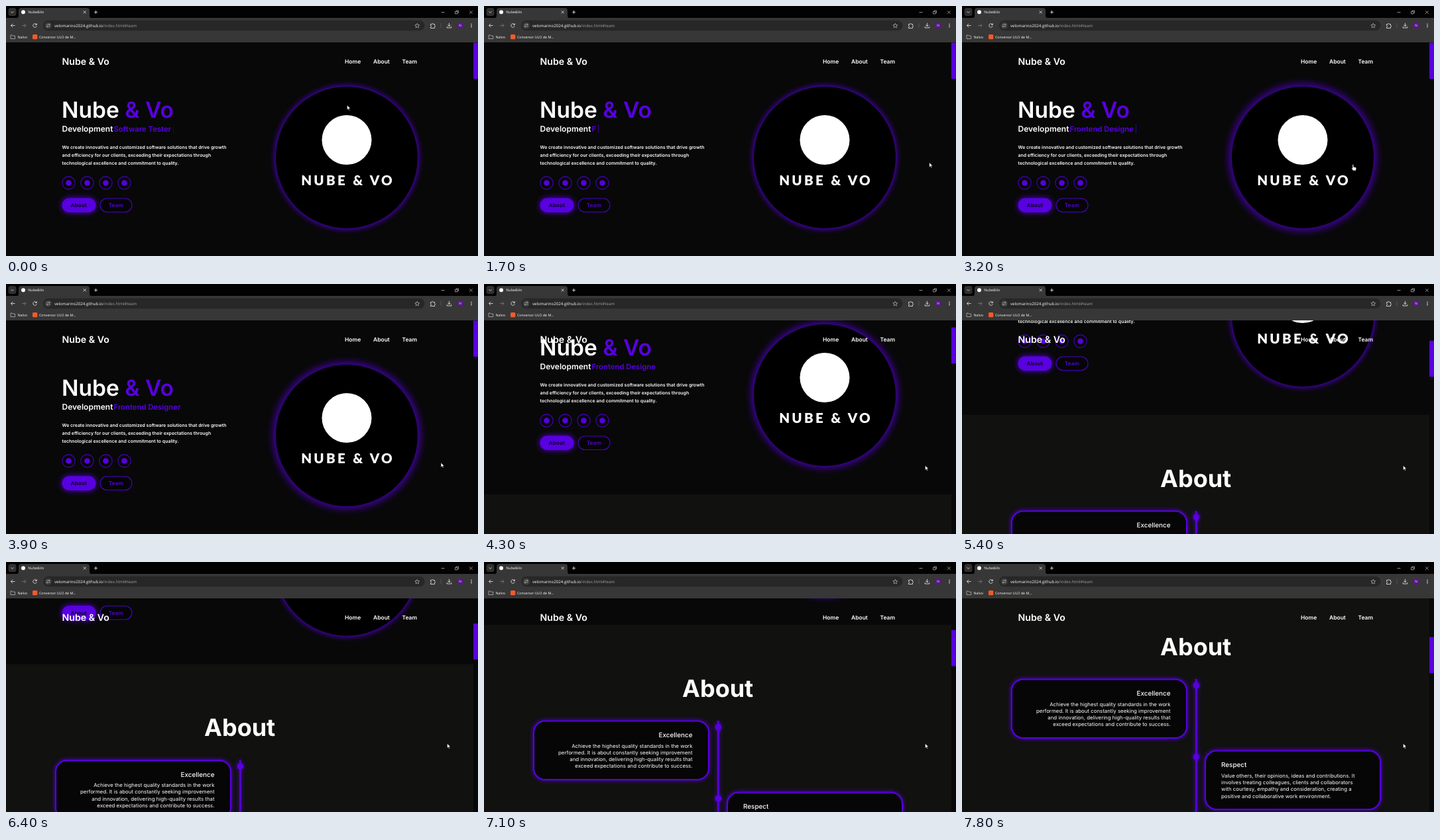
Animation, 712 px wide and 378 px high, one loop 8 s. Source, as an HTML page:

```html
<!DOCTYPE html>
<html lang="en">
<head>
<meta charset="utf-8">
<title>Nube&amp;Vo</title>
<style>
html, body { margin: 0; width: 100%; height: 100%; overflow: hidden; background: #080808; }
svg { display: block; width: 712px; height: 378px; }
text { font-family: Inter, sans-serif; fill: #fff; text-rendering: geometricPrecision; white-space: pre; }
.semi { font-weight: 600; }
.accent { fill: #5800e0; }
.line { fill: #050507; stroke: #4c00c4; stroke-width: 1.1; }
.glow { filter: drop-shadow(0 0 3px #5800e0); }
.wide { filter: drop-shadow(0 0 5px #5800e0); }
.lead { font-size: 6.95px; font-weight: 600; }
.role { font-size: 11.3px; font-weight: 600; }
.button { font-size: 8px; font-weight: 600; letter-spacing: .25px; text-anchor: middle; }
.nav { font-size: 8.5px; font-weight: 600; }
.card { fill: #060606; stroke: #5800e0; stroke-width: 2; }
.title { font-size: 9.9px; font-weight: 500; }
.copy { font-size: 7.85px; }
.end { text-anchor: end; }
.ui text { font-family: "Open Sans", sans-serif; }
.icon { fill: none; stroke: #dcdcdc; stroke-width: .9; }
.thin { fill: none; stroke: #c4c4c4; stroke-width: .7; }
</style>
</head>
<body>
<svg viewBox="0 0 712 378">
  <rect width="712" height="378" fill="#080808"/>

  <g id="page">
    <text class="semi" x="84" y="169" font-size="33.6">Nube <tspan class="accent">&amp; Vo</tspan></text>
    <text class="semi" x="84.5" y="190" font-size="12">Development</text>
    <text class="role accent" x="162.5" y="190"><tspan id="role"></tspan><tspan id="caret" dx="1.5" font-weight="300">|</tspan></text>
    <text class="lead" x="84.5" y="216">We create innovative and customized software solutions that drive growth</text>
    <text class="lead" x="84.5" y="228.2">and efficiency for our clients, exceeding their expectations through</text>
    <text class="lead" x="84.5" y="240.4">technological excellence and commitment to quality.</text>
    <g id="social"></g>
    <rect class="accent wide" x="84.5" y="290.5" width="51" height="21.5" rx="10.7"/>
    <text class="button" x="109.8" y="304.2" style="fill:#08000f">About</text>
    <rect class="line" x="142" y="291" width="48" height="20.5" rx="10.2"/>
    <text class="button accent" x="166" y="304.2">Team</text>

    <circle id="halo" class="accent" cx="514" cy="229"/>
    <circle cx="514" cy="229" r="107"/>
    <circle cx="514" cy="202.5" r="37.5" fill="#fff"/>
    <text x="515.6" y="271" font-size="20.5" font-weight="900" letter-spacing="3.3" text-anchor="middle" style="font-family:Lato,sans-serif">NUBE &amp; VO</text>

    <rect y="379" width="705" height="500" fill="#11110f"/>
    <text x="352.7" y="487.5" font-size="36" font-weight="700" text-anchor="middle">About</text>
    <g class="glow">
      <rect class="accent" x="352" y="524" width="2.6" height="300"/>
      <circle class="accent" cx="353.4" cy="533.5" r="4.8"/>
      <circle class="accent" cx="353.4" cy="641.5" r="4.8"/>
    </g>
    <rect class="card glow" x="75" y="524.5" width="264" height="88.5" rx="17"/>
    <text class="title end" x="314.5" y="549">Excellence</text>
    <g class="end" id="excellence"></g>
    <rect class="card glow" x="367" y="632.5" width="264" height="88.5" rx="17"/>
    <text class="title" x="391" y="656.8">Respect</text>
    <g id="respect"></g>
  </g>

  <text class="semi" x="84.5" y="88.8" font-size="14.2">Nube &amp; Vo</text>
  <text class="nav" x="511" y="87">Home</text>
  <text class="nav" x="554" y="87">About</text>
  <text class="nav" x="597.5" y="87">Team</text>
  <rect x="705" y="55" width="7" height="323" fill="#080808"/>
  <rect id="thumb" class="accent" x="705" width="7" height="54.5"/>

  <g class="ui">
    <rect width="712" height="19" fill="#020202"/>
    <rect y="18" width="712" height="37" fill="#373737"/>
    <path d="M15 18.5q4 0 4-4V7q0-4 4-4h99q4 0 4 4v7.5q0 4 4 4z" fill="#373737"/>
    <rect x="3.5" y="3" width="12" height="12" rx="3.5" fill="#303030"/>
    <path class="icon" d="M7.5 8.3l2 2 2-2M116.7 7.3l4 4m0-4l-4 4M133 9.3h5m-2.5-2.5v5"/>
    <path class="thin" d="M656.5 9.5h5M677.5 8.3h3.5v3.5h-3.5zM679 8v-1h3.5v3.5h-1M699 7.2l4.6 4.6m0-4.6l-4.6 4.6"/>
    <circle cx="26" cy="9.3" r="3" fill="#fff"/>
    <text x="33.3" y="11.4" font-size="5.4">Nube&amp;Vo</text>

    <path class="icon" d="M13.5 29.5h-6m2.6-2.7l-2.7 2.7 2.7 2.7"/>
    <path class="icon" d="M24 29.5h6m-2.6-2.7l2.7 2.7-2.7 2.7" style="stroke:#777"/>
    <path class="icon" d="M46 28a2.8 2.8 0 1 0 .3 2.3M46.3 26.3v2.2h-2.2"/>
    <rect x="56" y="21.8" width="575.5" height="15.4" rx="7.7" fill="#272727"/>
    <circle cx="63.7" cy="29.5" r="5.3" fill="#3b3b3b"/>
    <path class="thin" d="M61 28h2.5M64 31h2.500"/>
    <circle class="thin" cx="65.3" cy="28" r="1"/>
    <circle class="thin" cx="62.2" cy="31" r="1"/>
    <text x="73" y="31.8" font-size="6.12">velomarino2024.github.io<tspan fill="#a0a0a0">/index.html#team</tspan></text>
    <path class="thin" d="M620.3 26.3l1 2.2 2.4.3-1.8 1.6.5 2.4-2.1-1.2-2.1 1.2.5-2.4-1.8-1.6 2.4-.3z"/>
    <path class="icon" d="M640.5 27.5h2a1 1 0 0 1 2 0h2v2a1 1 0 0 1 0 2v2h-6v-1.8a1.1 1.1 0 0 0 0-2.2z"/>
    <path d="M656 26v7" stroke="#555"/>
    <path class="icon" d="M668.5 25.8v5m-2.3-2.2l2.3 2.3 2.3-2.3M665.2 31v2h6.6v-2"/>
    <circle cx="685" cy="29.5" r="4.7" fill="#5b168f"/>
    <text x="685" y="31.2" font-size="4.8" text-anchor="middle">N</text>
    <path d="M702 26.8v5.5" stroke="#eee" stroke-width="1.3" stroke-dasharray="1.3 .8"/>
    <path class="thin" d="M7 44h2.5l1 1.2h3.2v4.3H7z"/>
    <text x="17.5" y="48.7" font-size="5.4">Nalvo</text>
    <rect x="40" y="43" width="7.3" height="7.3" rx="1.5" fill="#ef5b2b"/>
    <text x="50" y="48.7" font-size="5.3">Conversor ULO de M...</text>
  </g>

  <g id="pointer" fill="#fff" stroke="#000" stroke-width=".5">
    <path id="arrow" d="M0 0v7l1.7-1.6 1.1 2.5 1.1-.5-1.1-2.4h2.3z"/>
    <path id="hand" d="M-1 0q1-1 1.7 0v3.3l3.3.8q1 .4.8 1.5l-.7 3.4h-4l-2.5-3.3q0-1.3 1.4-.5z"/>
  </g>
</svg>
<script>
const $ = id => document.getElementById(id);

const paragraph = (x, y, lines) => lines.map((line, i) =>
  `<text class="copy" x="${x}" y="${y + i * 10.2}">${line}</text>`).join('');

$('excellence').innerHTML = paragraph(314.5, 564.7, [
  'Achieve the highest quality standards in the work',
  'performed. It is about constantly seeking improvement',
  'and innovation, delivering high-quality results that',
  'exceed expectations and contribute to success.']);
$('respect').innerHTML = paragraph(391, 673, [
  'Value others, their opinions, ideas and contributions. It',
  'involves treating colleagues, clients and collaborators',
  'with courtesy, empathy and consideration, creating a',
  'positive and collaborative work environment.']);
$('social').innerHTML = [94.5, 122.5, 150.5, 178.5].map(x =>
  `<circle class="line" cx="${x}" cy="267.5" r="9.6"/>
   <circle class="accent" cx="${x}" cy="267.5" r="4.3"/>`).join('');

// Each key is [time, value, ...]; values are joined by straight lines.
const scrollKeys = [[4000, 0], [4300, 61], [5400, 181], [6400, 224.5], [6900, 243],
  [7000, 243], [7100, 284], [7800, 347]];
const pointerKeys = [[200, 514.5, 150], [1100, 679, 231], [1600, 679, 231],
  [2000, 650, 254], [2300, 650, 254], [3200, 590, 240], [4000, 665.5, 274.5]];
const haloKeys = [[2200, 0], [3200, 1], [3600, 1], [5200, 0]];

function at(keys, t, k = 1) {
  const i = keys.findIndex(key => key[0] > t);
  if (i < 0) return keys[keys.length - 1][k];
  if (i === 0) return keys[0][k];
  const a = keys[i - 1], b = keys[i];
  return a[k] + (b[k] - a[k]) * (t - a[0]) / (b[0] - a[0]);
}

function typed(t) {
  const erase = (word, start) =>
    word.slice(0, Math.max(0, word.length - Math.max(0, Math.ceil((t - start) / 72))));
  if (t < 1650) return erase('Software Tester', 250);
  const word = 'Frontend Designer';
  return t < 4250 ? word.slice(0, Math.floor((t - 1650) / 100) + 1) : erase(word, 4250);
}

function draw(now) {
  let t = Math.floor(now % 8000 / 100) * 100;
  if (t > 2000 && t < 2300) t = 2000;

  const scroll = at(scrollKeys, t);
  $('page').setAttribute('transform', `translate(0 ${-scroll})`);
  $('thumb').setAttribute('y', 55.5 + scroll * .167);

  $('role').textContent = typed(t);
  const caretOn = t < 100 || t >= 300 && t < 1500 || t >= 1700 && t < 3300;
  $('caret').style.opacity = caretOn ? (t < 100 ? .5 : 1) : 0;

  const halo = at(haloKeys, t);
  $('halo').setAttribute('r', 108.5 + 3.5 * halo);
  $('halo').style.filter = `blur(${4.5 + halo}px)`;
  $('halo').style.opacity = .9 - .25 * halo;

  const x = at(pointerKeys, t), y = at(pointerKeys, t, 2);
  const over = t >= 300 && Math.hypot(x - 514, y - 229) < 107;
  $('pointer').setAttribute('transform', `translate(${x} ${y})`);
  $('arrow').style.display = over ? 'none' : '';
  $('hand').style.display = over ? '' : 'none';
}

const start = performance.now();
function loop() {
  draw(performance.now() - start);
  requestAnimationFrame(loop);
}
loop();
</script>
</body>
</html>
```
